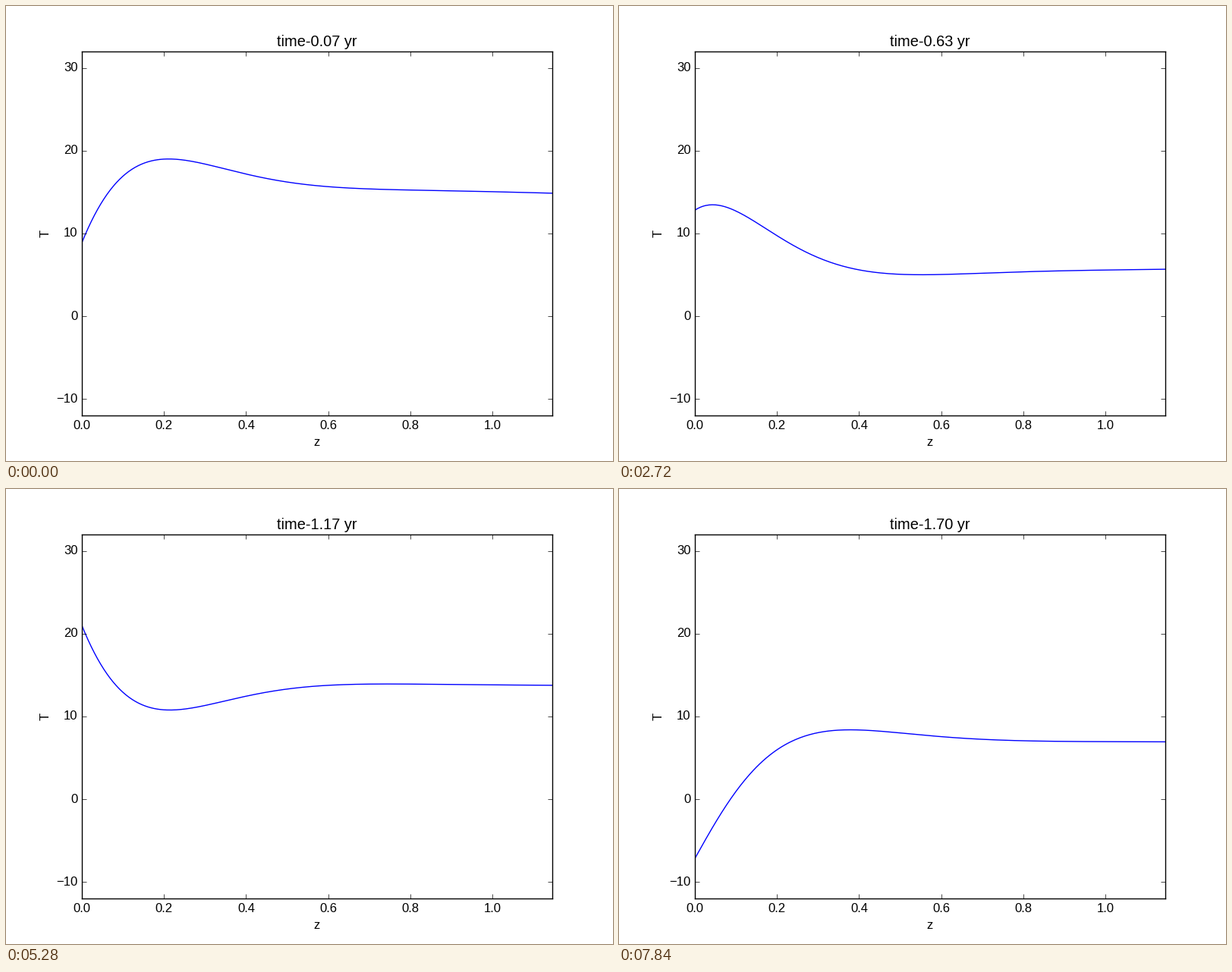
A matplotlib script that plays this animation: 800 by 600 pixels, repeating every 8 s.

```python
import numpy as np
import matplotlib.pyplot as plt
from matplotlib.animation import FuncAnimation

plt.rcParams.update({
    "font.family": "Liberation Sans",
    "font.size": 12,
    "axes.titlesize": 14.4,
    "axes.titlepad": 5,
    "axes.labelpad": 5,
    "axes.linewidth": 1.0,
    "axes.axisbelow": False,
    "lines.linewidth": 1.0,
    "ytick.alignment": "center",
})
for axis in ("xtick", "ytick"):
    plt.rcParams.update({
        f"{axis}.direction": "in",
        f"{axis}.major.size": 4,
        f"{axis}.major.width": 0.5,
        f"{axis}.major.pad": 4,
    })

DAY = 86400.0
YEAR = 365 * DAY
KAPPA = 1e-6                      # thermal diffusivity, m^2/s
T_MEAN, A_YEAR, A_DAY = 10, 7, 15
FRAMES, STEPS_PER_YEAR, FIRST_STEP = 50, 30, 2


def skin_depth(period):
    return np.sqrt(KAPPA * period / np.pi)


def wave(z, t, amp, period):
    """Damped temperature wave travelling down into the ground."""
    u = z / skin_depth(period)
    return amp * np.exp(-u) * np.cos(2 * np.pi * t / period - u)


def temperature(z, t):
    return T_MEAN + wave(z, t, A_YEAR, YEAR) + wave(z, t, A_DAY, DAY)


# Deep enough for the daily wave to shrink a thousandfold
z_max = skin_depth(DAY) * np.log(1000)
z = np.linspace(0, z_max, 300)

fig = plt.figure(figsize=(8, 6), dpi=100, facecolor="white")
ax = fig.add_axes([0.125, 0.1, 0.775, 0.8])
ax.set_xlim(0, z_max)
ax.set_ylim(-12, 32)
ax.set_xticks(np.arange(0, 1.1, 0.2))
ax.set_yticks(range(-10, 31, 10))
ax.tick_params(top=True, right=True)
ax.set_xlabel("z")
ax.set_ylabel("T")
title = ax.set_title("")
line, = ax.plot([], [], color="#0000ff")


def update(i):
    years = (i + FIRST_STEP) / STEPS_PER_YEAR
    line.set_data(z, temperature(z, years * YEAR))
    title.set_text(f"time-{years:.2f} yr")
    return line, title


anim = FuncAnimation(fig, update, frames=FRAMES, interval=160,
                     init_func=lambda: update(0), repeat=True, repeat_delay=0)
plt.show()
```
